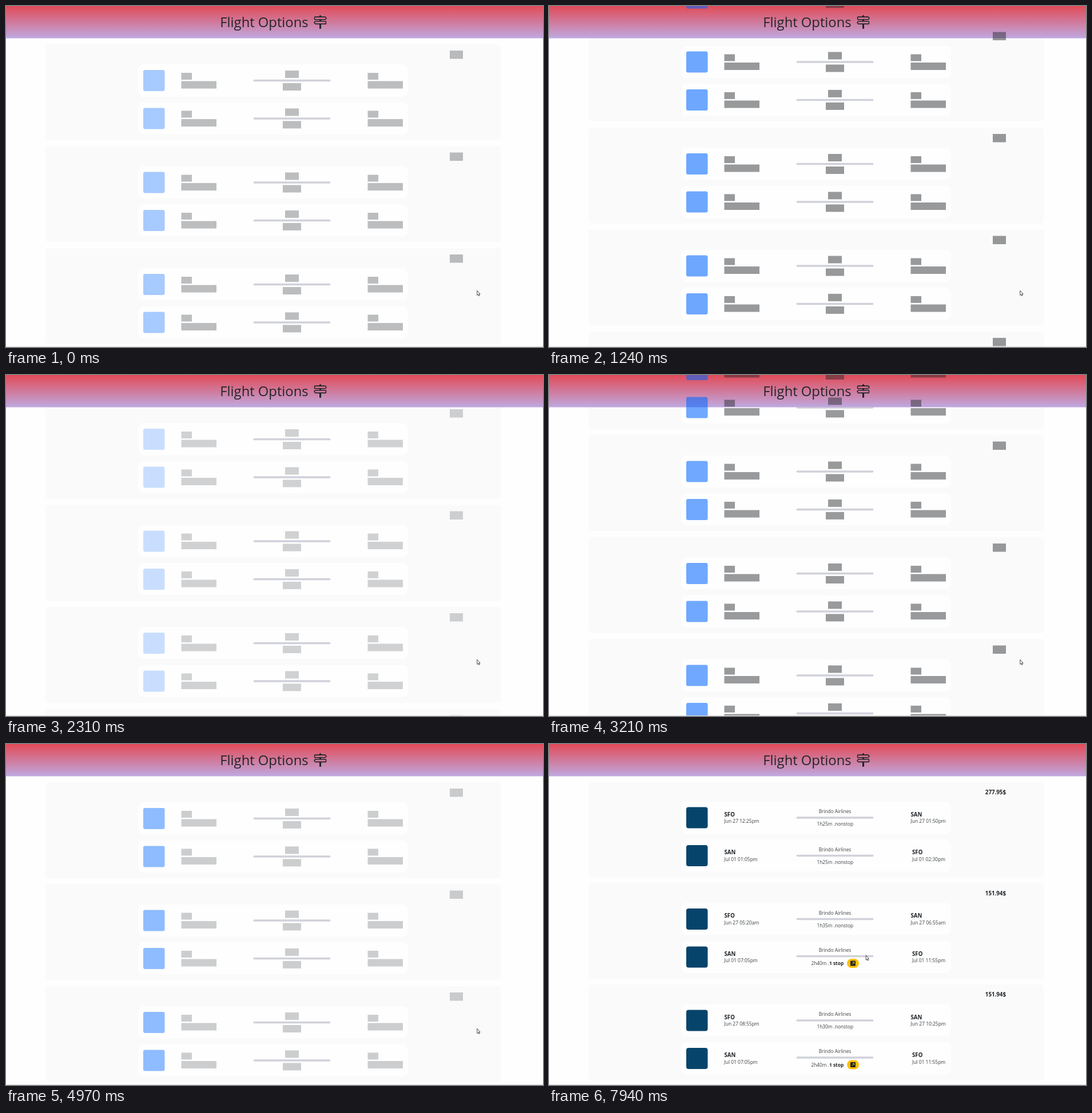
These frames come from a looping animation (939x597 px, 8000 ms). An HTML page with a canvas:

```html
<!DOCTYPE html>
<html lang="en">
<head>
<meta charset="utf-8">
<title>Flight Options</title>
<style>
  html, body { margin: 0; width: 100%; height: 100%; overflow: hidden; background: #fefefe; }
  canvas { display: block; width: 939px; height: 597px; }
</style>
</head>
<body>
<canvas id="stage"></canvas>
<script>
const W = 939, H = 597, LOOP = 8000, LOADED = 6180;
const AIRLINE = 'Brindo Airlines';
const INK = '#212529';
const FONT = '"Open Sans", "Noto Sans", sans-serif';

const canvas = document.getElementById('stage');
const ctx = canvas.getContext('2d');
const ratio = window.devicePixelRatio || 1;
canvas.width = W * ratio;
canvas.height = H * ratio;
ctx.scale(ratio, ratio);

const signpost = new Path2D('M7 1.414V2H2a1 1 0 0 0-1 1v2a1 1 0 0 0 1 1h5v1H2.5a1 1 0 0 0-.8.4L.725 8.7a.5.5 0 0 0 0 .6l.975 1.3a1 1 0 0 0 .8.4H7v5h2v-5h5a1 1 0 0 0 1-1V8a1 1 0 0 0-1-1H9V6h4.5a1 1 0 0 0 .8-.4l.975-1.3a.5.5 0 0 0 0-.6L14.3 2.4a1 1 0 0 0-.8-.4H9v-.586a1 1 0 0 0-2 0M13.5 3l.75 1-.75 1H2V3zm.5 5v2H2.5l-.75-1 .75-1z');
const pointer = new Path2D('M0 0V8.2L1.8 6.6 3 9.2 4.2 8.7 3.1 6.1H5.3Z');

// Scroll positions, each run starting at a time and advancing at a fixed interval.
const scrollRuns = [
  [620, 68, [25, 80, 118, 146, 165, 179]],
  [1100, 67, [198, 205, 211, 214.5, 217.5, 220, 222.5, 224.5, 226.5, 228, 229.5, 230.5]],
  [1910, 80, [222, 195, 145, 90, 45, 18, 0]],
  [3140, 66.6, [60, 140, 200, 230.5]],
  [3880, 66.6, [215, 152, 152, 55.5, 15, 0]]
];
const fullUpdates = [{ time: 0, scroll: 0 }];
for (const [start, interval, positions] of scrollRuns)
  positions.forEach((scroll, i) => fullUpdates.push({ time: start + i * interval, scroll }));
fullUpdates.push({ time: 5590, scroll: 0 });

// Moments when only the blue tiles repaint.
const tileUpdates = [130, 340, 2740, 2860, 3000, 3740, 4830, 4970, 5110, 5250];

const flights = [
  { top: 67, height: 166.5, price: '277.95$', legs: [
    { y: 100.5, from: 'SFO', to: 'SAN', leave: 'Jun 27 12:25pm', arrive: 'Jun 27 01:50pm', span: '1h25m' },
    { y: 167, from: 'SAN', to: 'SFO', leave: 'Jul 01 01:05pm', arrive: 'Jul 01 02:30pm', span: '1h25m' }] },
  { top: 244, height: 167, price: '151.94$', legs: [
    { y: 278, from: 'SFO', to: 'SAN', leave: 'Jun 27 05:20am', arrive: 'Jun 27 06:55am', span: '1h35m' },
    { y: 344.5, from: 'SAN', to: 'SFO', leave: 'Jul 01 07:05pm', arrive: 'Jul 01 11:55pm', span: '2h40m', stop: true }] },
  { top: 421.5, height: 167.5, price: '151.94$', legs: [
    { y: 455.5, from: 'SFO', to: 'SAN', leave: 'Jun 27 08:55pm', arrive: 'Jun 27 10:25pm', span: '1h30m' },
    { y: 522, from: 'SAN', to: 'SFO', leave: 'Jul 01 07:05pm', arrive: 'Jul 01 11:55pm', span: '2h40m', stop: true }] }
];

function box(x, y, w, h, color, radius = 0) {
  ctx.fillStyle = color;
  ctx.beginPath();
  ctx.roundRect(x, y, w, h, radius);
  ctx.fill();
}

function text(value, x, y, size, { weight = 400, align = 'left', color = INK } = {}) {
  ctx.font = `${weight} ${size}px ${FONT}`;
  ctx.textAlign = align;
  ctx.fillStyle = color;
  ctx.fillText(value, x, y);
}

const card = (y, height) => box(69, y, 796, height, '#fafafa', 5);
const row = y => box(231, y, 472, 56.5, '#fefefe', 10);
const track = y => box(432.5, y, 135, 3.5, '#d0d1da', 1.75);

function header() {
  const gradient = ctx.createLinearGradient(0, 0, 0, 56.5);
  gradient.addColorStop(0, '#e14b58');
  gradient.addColorStop(1, '#bfa9e0');
  box(0, 0, W, 56.5, gradient);
  text('Flight Options', 451.5, 37, 23.8, { weight: 500, align: 'center' });
  ctx.save();
  ctx.translate(537.3, 15.3);
  ctx.scale(1.53, 1.53);
  ctx.fill(signpost, 'evenodd');
  ctx.restore();
}

const pulse = t => (1 + Math.cos(2 * Math.PI * (t - 1410) / 2000)) / 2;

function skeleton(t) {
  const update = fullUpdates.findLast(u => u.time <= t);
  const tileTime = Math.max(update.time, tileUpdates.findLast(time => time <= t) ?? 0);
  const grey = `rgba(33, 37, 41, ${0.195 + 0.295 * pulse(update.time)})`;
  const blue = `rgba(0, 102, 255, ${0.2 + 0.4 * pulse(tileTime)})`;
  const tops = Array.from({ length: 6 }, (_, i) => 67 + i * 178.5 - update.scroll);
  const rows = tops.flatMap(y => [y + 35, y + 101.4]);

  tops.forEach(y => card(y, 167.5));
  rows.forEach(y => { row(y); track(y + 26.8); });
  header();

  // Translucent placeholders paint above the sticky header.
  tops.forEach(y => box(776, y + 11, 23, 14.5, grey));
  for (const y of rows) {
    box(240, y + 10, 37.5, 37, blue, 3);
    for (const x of [306.5, 632.5]) {
      box(x, y + 15, 18.5, 12, grey);
      box(x, y + 29.5, 61.5, 13, grey);
    }
    box(488, y + 11, 24, 13, grey);
    box(484, y + 33, 32, 13, grey);
  }
}

function stopBadge(y) {
  box(521, y, 21, 16, '#ffc107', 8);
  box(527, y + 3.5, 9, 9, INK, 1);
  ctx.strokeStyle = '#ffc107';
  ctx.lineWidth = 0.9;
  ctx.beginPath();
  ctx.moveTo(529.3, y + 10.2);
  ctx.lineTo(533.6, y + 5.9);
  ctx.moveTo(530.6, y + 5.8);
  ctx.lineTo(533.7, y + 5.8);
  ctx.lineTo(533.7, y + 8.9);
  ctx.stroke();
}

function leg({ y, from, to, leave, arrive, span, stop }) {
  const lift = stop ? 1.5 : 0;
  const arrivalX = to === 'SAN' ? 632.5 : 635;
  const soft = { color: '#3b3f43' };
  row(y);
  box(240, y + 10, 37.5, 37, '#07446b', 4);
  text(from, 306.5, y + 26, 9.7, { weight: 700 });
  text(leave, 306.5, y + 37.7, 8.45, soft);
  text(to, arrivalX, y + 26, 9.7, { weight: 700 });
  text(arrive, arrivalX, y + 37.7, 8.45, soft);
  text(AIRLINE, 500, y + 20.9 - lift, 8.25, { ...soft, align: 'center' });
  track(y + 26.8 - lift);
  if (stop) {
    text(`${span} .`, 458.5, y + 42.7, 8.3, soft);
    text('1 stop', 490, y + 42.7, 8.4, { weight: 700 });
    stopBadge(y + 31.5);
  } else {
    text(`${span} .nonstop`, 500.3, y + 42.7, 8.3, { ...soft, align: 'center' });
  }
}

function results() {
  for (const { top, height, price, legs } of flights) {
    card(top, height);
    text(price, 799, top + 20.5, 9.75, { weight: 700, align: 'right' });
    legs.forEach(leg);
  }
  header();
}

function cursor(t) {
  const step = Math.max(0, Math.min(9, Math.floor((t - 7390) / 68.75) + 1));
  const p = step / 9;
  const eased = p * p * (3 - 2 * p);
  ctx.save();
  ctx.translate(823.8 - 269.6 * eased, 498.3 - 128.3 * eased);
  ctx.fillStyle = '#fff';
  ctx.fill(pointer);
  ctx.strokeStyle = '#222';
  ctx.lineWidth = 0.8;
  ctx.stroke(pointer);
  ctx.restore();
}

function draw(now) {
  const t = now % LOOP;
  box(0, 0, W, H, '#fefefe');
  if (t < LOADED) skeleton(t);
  else results();
  box(0, 596, W, 1, '#dcdcdc');
  cursor(t);
  requestAnimationFrame(draw);
}
requestAnimationFrame(draw);
</script>
</body>
</html>
```
